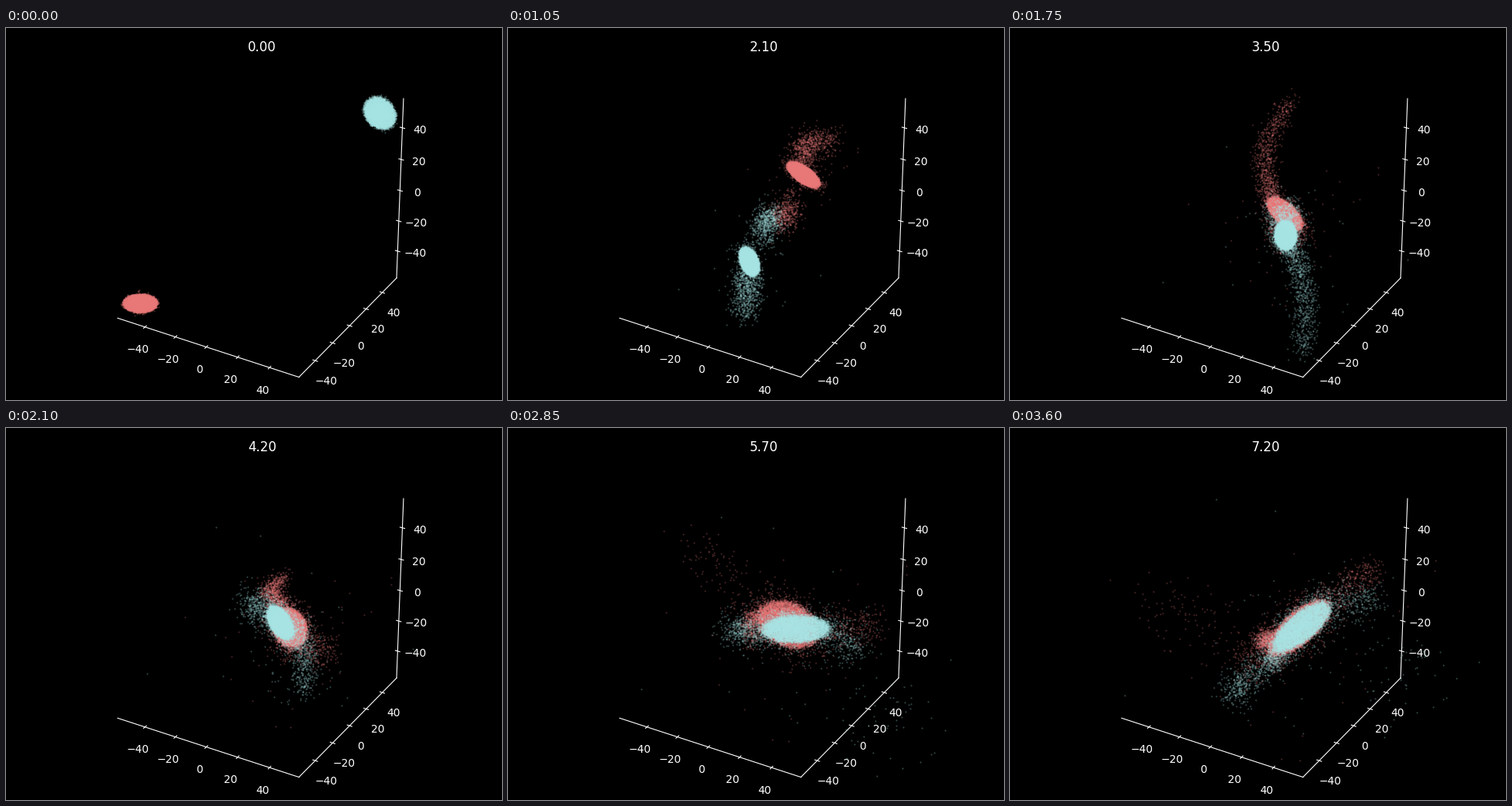
Animation of 640x480 px, one loop 3650 ms. Source, as a matplotlib script:

```python
import numpy as np
import matplotlib.pyplot as plt
from matplotlib.animation import FuncAnimation

W, H, DPI = 640, 480, 100
FRAMES, INTERVAL, DT = 73, 50, 0.1
SCALE, CENTER = 2700, np.array([326.8, 234.0])
HALF_RANGE = 58.2
N_CORE, N_HALO, N_TAIL, N_STRAY = 6500, 1300, 700, 35
MEET = 1.4
RED, BLUE = "#eb7a7a", "#a8e6e6"

plt.rcParams["font.family"] = "DejaVu Sans"
rng = np.random.default_rng(7)

fig = plt.figure(figsize=(W / DPI, H / DPI), dpi=DPI, facecolor="black")
ax = fig.add_axes([0, 0, 1, 1])
ax.set(xlim=(0, W), ylim=(H, 0))
ax.axis("off")


# ---- perspective axes ----

def project(x, y, z):
    """Map unit-cube coordinates (-0.5..0.5) to stage pixels."""
    c, s = np.cos(np.pi / 6), 0.5
    depth = 10 - (c * s * x - c * c * y + s * z)
    right = c * x + s * y
    up = -s * s * x + s * c * y + c * z
    return CENTER + SCALE * np.array([right, -up]) / depth


def stroke(start, end):
    ax.plot(*np.transpose([start, end]), color="white", lw=0.8, zorder=1)


def label(x, y, text, size):
    """Draw text whose digits are centred on (x, y)."""
    return ax.text(x, y + 0.365 * size * DPI / 72, text, color="white",
                   fontsize=size, ha="center", va="baseline", zorder=1)


def draw_axis(point, tick_dir, offset):
    """point(s) gives the cube position at s along the axis."""
    stroke(project(*point(-0.5)), project(*point(0.5)))
    step = 0.0125 * np.array(tick_dir)
    for value in range(-40, 41, 20):
        p = np.array(point(value / (2 * HALF_RANGE)))
        stroke(project(*(p - step)), project(*(p + step)))
        x, y = project(*p) + offset
        label(x, y, str(value).replace("-", "\u2212"), 10)


draw_axis(lambda s: (s, -0.5, -0.5), (0, 1, 0), (-9, 28.6))
draw_axis(lambda s: (0.5, s, -0.5), (1, 0, 0), (14.6, 25.3))
draw_axis(lambda s: (0.5, 0.5, s), (1, 0, 0), (22.4, 2.2))


# ---- motion ----

def spline(times, rows, t):
    """Cubic Hermite curve through rows at uneven times."""
    slopes = np.gradient(rows, times, axis=0)
    i = int(np.clip(np.searchsorted(times, t, "right") - 1, 0, len(times) - 2))
    h = times[i + 1] - times[i]
    u = (t - times[i]) / h
    return ((1 + 2 * u) * (1 - u) ** 2 * rows[i]
            + u * (1 - u) ** 2 * h * slopes[i]
            + u * u * (3 - 2 * u) * rows[i + 1]
            + u * u * (u - 1) * h * slopes[i + 1])


class Core:
    """Moving ellipse; keys hold time, centre, half-axes and tilt."""

    def __init__(self, keys):
        keys = np.array(keys, float)
        self.times, self.rows = keys[:, 0], keys[:, 1:]

    def at(self, t):
        if t < MEET:
            s = t / MEET
            s *= 0.85 + 0.15 * s
            return (1 - s) * self.rows[0] + s * self.rows[1]
        return spline(self.times[1:], self.rows[1:], t)

    def middle(self, t):
        return self.at(t)[:2]

    def axes(self, t):
        a, b, tilt = self.at(t)[2:]
        c, s = np.cos(np.radians(tilt)), np.sin(np.radians(tilt))
        return np.array([[a * c, a * s], [-b * s, b * c]])


class Tail:
    """Particles along a quadratic curve that unwinds from the core."""
    TIMES = np.array([0, 1.2, MEET, 2.7, 3.5, 4.9, 6.4, 7.2])

    def __init__(self, core, other, rows):
        rows = np.array(rows, float)
        for row, t in zip(rows, self.TIMES[3:]):
            row[:6] -= np.tile(core.middle(t), 3)
        calm = np.array([0] * 6 + [5])
        pull = 0.3 * (core.middle(MEET) - other.middle(MEET))
        first = np.append(np.tile(pull, 3), 8)
        self.rows = np.vstack([calm, calm, first, rows])
        self.u = rng.random((N_TAIL, 1)) ** 1.25
        self.spread = rng.normal(size=(N_TAIL, 2))

    def at(self, t, middle):
        row = spline(self.TIMES, self.rows, t)
        a, b, c = row[:6].reshape(3, 2)
        u = self.u
        curve = (1 - u) ** 2 * a + 2 * u * (1 - u) * b + u * u * c
        return middle + curve + max(row[6], 2) * self.spread


class Tuft:
    """Particles picked up by the other core and later flung outwards."""
    TIMES = np.array([0, 1.2, 2.7, 3.5, 4.9, 6.4, 7.2])

    def __init__(self, core, other, count, rows):
        calm = np.array([0, 0, 5])
        held = [np.append(other.middle(t), 12) for t in self.TIMES[2:4]]
        rows = np.vstack([held, rows])
        for row, t in zip(rows, self.TIMES[2:]):
            row[:2] -= core.middle(t)
        self.rows = np.vstack([calm, calm, rows])
        self.reach = 1 - 0.5 * rng.random((count, 1)) ** 2
        self.spread = rng.normal(size=(count, 2))

    def at(self, t, middle):
        row = spline(self.TIMES, self.rows, t)
        return middle + self.reach * row[:2] + max(row[2], 2) * self.spread


def swirl(r, angle, t):
    turn = angle + 4 * t / (0.6 + r)
    return np.stack([r * np.cos(turn), r * np.sin(turn)], axis=1)


class Galaxy:
    """A rotating elliptical core with a halo, a tail, tufts and strays."""

    def __init__(self, color, core, other, tail, tufts):
        self.core = core
        self.r = rng.random(N_CORE) ** 0.55 * (1 + 0.07 * rng.normal(size=N_CORE))
        self.halo_r = np.hypot(*rng.normal(size=(2, N_HALO)))
        self.angle = rng.uniform(0, 2 * np.pi, N_CORE)
        self.streams = [Tail(core, other, tail)]
        self.streams += [Tuft(core, other, *tuft) for tuft in tufts]
        self.strays = rng.normal(size=(N_STRAY, 2))
        self.dots, = ax.plot([], [], "o", ms=1.5, mew=0, color=color,
                             alpha=0.3, zorder=2)

    def update(self, t):
        middle, axes = self.core.middle(t), self.core.axes(t)
        loose = np.interp(t, [0, 1.2, 2.7, 7.2], [0.33, 0.4, 0.55, 0.72])
        wide = np.interp(t, [1.2, 2.7, 7.2], [5, 50, 80])
        parts = [middle + swirl(self.r, self.angle, t) @ axes,
                 middle + loose * swirl(self.halo_r, self.angle[:N_HALO], t) @ axes,
                 middle + wide * self.strays]
        parts += [s.at(t, middle) for s in self.streams]
        self.dots.set_data(*np.vstack(parts).T)


red_core = Core([
    (0, 173, 355, 21.5, 11.5, 0),
    (MEET, 350, 231, 22, 10, 25),
    (2.1, 381, 189, 24, 10, 35),
    (2.7, 364, 209, 28, 11, 42),
    (3.5, 354, 239, 27, 13, 42),
    (4.1, 366, 256, 25, 20, 60),
    (4.9, 352, 252, 32, 24, 80),
    (6.4, 372, 255, 46, 27, -30),
    (7.2, 373, 257, 48, 20, -41),
])
blue_core = Core([
    (0, 482, 109.5, 22, 18, 47),
    (MEET, 320, 251, 20, 11, 46),
    (2.1, 311, 301, 19, 11, 68),
    (2.7, 331, 287, 18.5, 11, 81),
    (3.5, 355, 267, 18.5, 13.5, 88),
    (4.1, 352, 251, 22, 13, 62),
    (4.9, 373, 261, 36, 16, 32),
    (6.4, 367, 255, 46, 17, -26),
    (7.2, 376, 256, 45, 17, -39),
])

# Three curve points and a width for each late tail time.
red_tail = [
    (350, 190, 322, 130, 410, 122, 6),
    (340, 215, 308, 165, 362, 92, 7),
    (345, 224, 312, 240, 345, 285, 5),
    (298, 275, 330, 230, 400, 222, 8),
    (330, 275, 325, 262, 345, 295, 7),
]
blue_tail = [
    (338, 302, 362, 350, 335, 412, 7),
    (362, 285, 392, 335, 375, 420, 8),
    (362, 232, 412, 226, 400, 275, 7),
    (325, 288, 320, 265, 360, 240, 7),
    (335, 305, 350, 280, 400, 215, 8),
]

# Particle count, then place and width for the last three tuft times.
red_tufts = [
    (90, [(283, 160, 16), (230, 195, 24), (200, 240, 28)]),
    (220, [(428, 295, 14), (480, 218, 13), (462, 185, 11)]),
    (150, [(335, 280, 9), (300, 270, 9), (303, 300, 14)]),
]
blue_tufts = [
    (400, [(312, 236, 12), (278, 293, 10), (288, 342, 11)]),
    (190, [(436, 298, 11), (452, 252, 10), (466, 218, 11)]),
    (60, [(455, 400, 35), (525, 350, 28), (520, 320, 30)]),
]

red = Galaxy(RED, red_core, blue_core, red_tail, red_tufts)
blue = Galaxy(BLUE, blue_core, red_core, blue_tail, blue_tufts)
clock = label(330.5, 24, "", 12)


def draw(frame):
    t = frame * DT
    red.update(t)
    blue.update(t)
    clock.set_text(f"{t:.2f}")
    return red.dots, blue.dots, clock


anim = FuncAnimation(fig, draw, frames=FRAMES, interval=INTERVAL,
                     repeat=True, repeat_delay=0)
plt.show()
```
